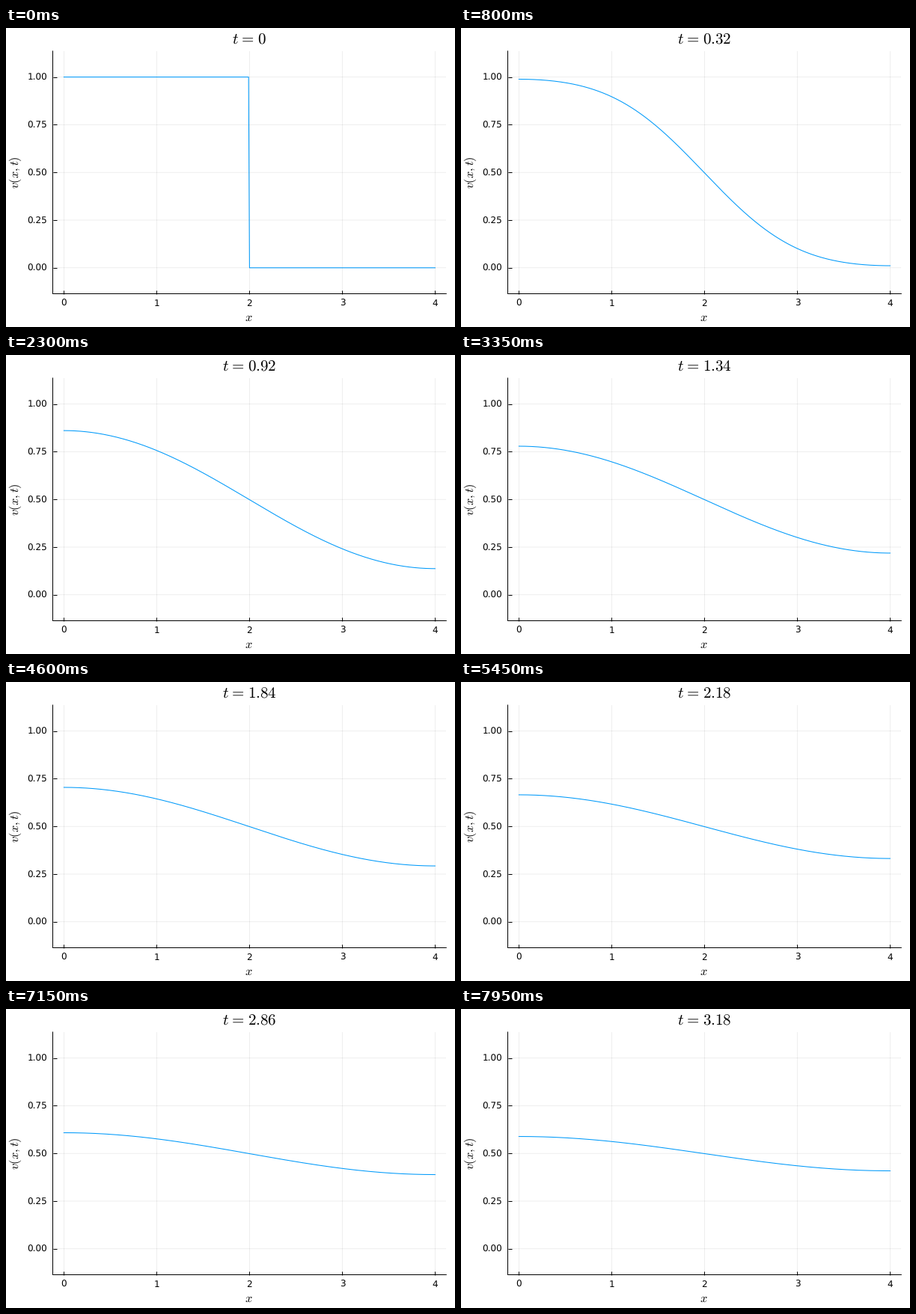
A matplotlib script that plays this animation: 600x400 px, repeating every 8 s.

```python
import numpy as np
import matplotlib.pyplot as plt
from matplotlib.animation import FuncAnimation

W, H, DPI = 600, 400, 100
FRAMES, INTERVAL, DT = 160, 50, 0.02
LENGTH, STEP = 4.0, 1.995
LAG = DT / 2   # the profile trails the clock by half a step
PX = 72 / DPI  # one pixel in points

plt.rcParams.update({
    "font.family": "DejaVu Sans",
    "mathtext.fontset": "cm",
    "text.hinting": "none",
    "path.snap": False,
})

x = np.linspace(0, LENGTH, 401)
n = np.arange(1, 400)[:, None]
k = n * np.pi / LENGTH
modes = 2 / (n * np.pi) * np.sin(k * STEP) * np.cos(k * x)


def solution(t):
    """Heat equation with insulated ends, starting from a step."""
    if t == 0:
        return np.where(x < STEP, 1.0, 0.0)
    decay = np.exp(-k**2 * (t - LAG))
    return STEP / LENGTH + (modes * decay).sum(axis=0)


fig = plt.figure(figsize=(W / DPI, H / DPI), dpi=DPI, facecolor="white")


def label(px, py, text, size, **kw):
    kw = {"ha": "center", "va": "baseline", **kw}
    return fig.text(px / W, 1 - py / H, text, fontsize=size, color="black", **kw)


left, right, top, bottom = 62.5, 588.3, 30.9, 355.5
ax = fig.add_axes([left / W, 1 - bottom / H, (right - left) / W, (bottom - top) / H])
ax.set_xlim(-0.12, 4.12)
ax.set_ylim(-0.136, 1.136)
ax.set_xticks(range(5), labels=[])
ax.set_yticks(np.arange(5) / 4, labels=[])
ax.tick_params(direction="in", length=5 * PX, width=PX, color="black")
ax.grid(color="black", alpha=0.1, linewidth=0.65 * PX)
ax.set_axisbelow(True)
for side in ("top", "right"):
    ax.spines[side].set_visible(False)
for side in ("left", "bottom"):
    ax.spines[side].set_linewidth(PX)

for i in range(5):
    label(77.4 + 124 * i, 371.5, str(i), 8.65)
    label(55, 325.3 - 63.8 * i, f"{i / 4:.2f}", 8.65, ha="right")
label(324.4, 392.3, "$x$", 11.8)
label(23, 193.5, "$v(x,t)$", 11.8, rotation=90, ha="right", va="center")
title = label(325, 21.5, "", 15.1)

curve, = ax.plot([], [], color="#009afa", linewidth=1.05 * PX, zorder=3)


def update(frame):
    t = frame * DT
    curve.set_data(x, solution(t))
    title.set_text(rf"$t\hspace{{0.08}}=\hspace{{0.08}}{t:g}$")
    return curve, title


anim = FuncAnimation(fig, update, frames=FRAMES, interval=INTERVAL,
                     repeat=True, repeat_delay=0, blit=False)
plt.show()
```
